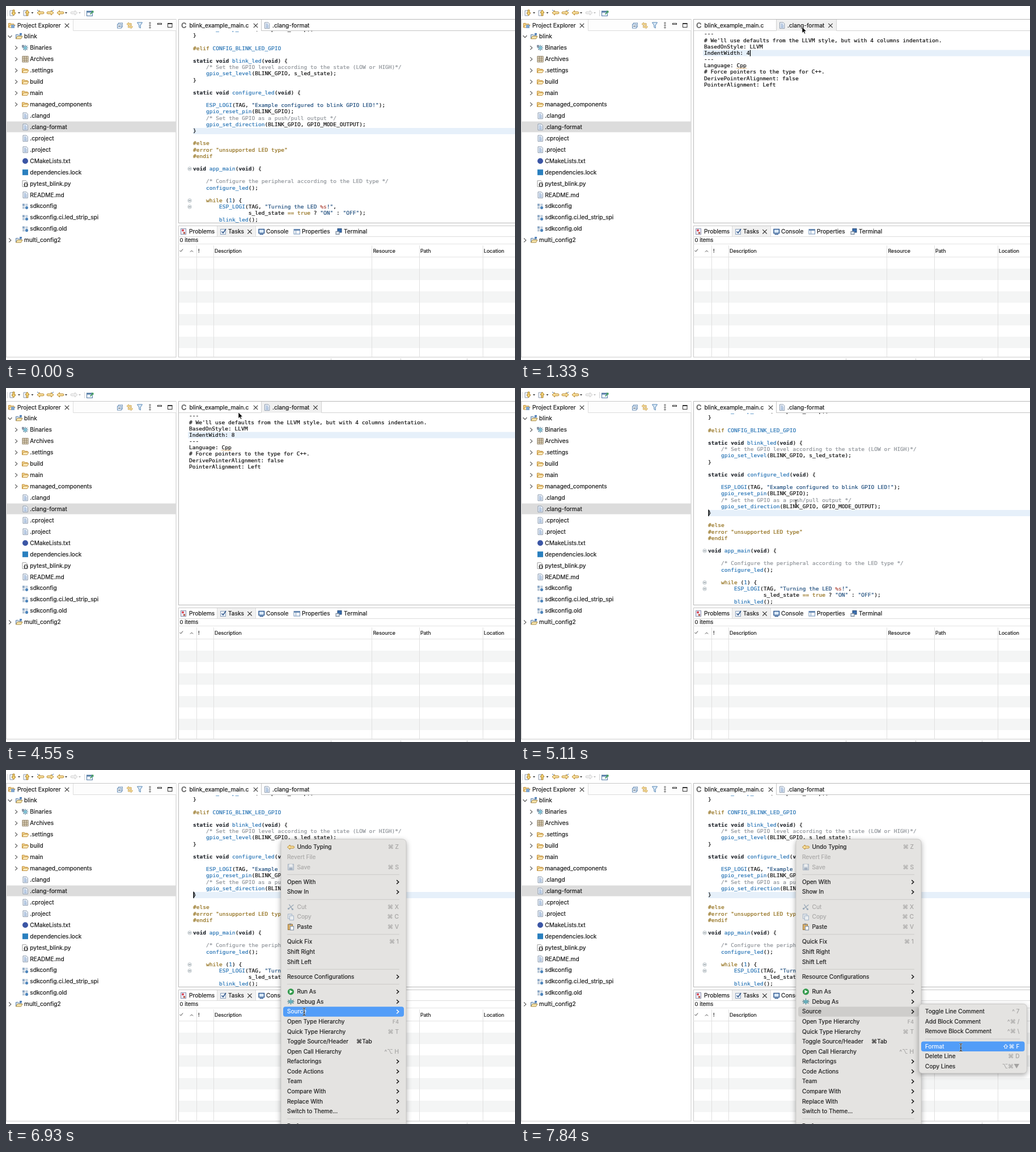
Write an HTML page that moves like this. It is 898x624 px and loops after 8 s.

```html
<!DOCTYPE html>
<html lang="en">
<head>
<meta charset="utf-8">
<title>Editor demo</title>
<style>
html, body { margin: 0; width: 100%; height: 100%; overflow: hidden; background: #fff; }
svg { display: block; }
text, tspan { fill: var(--ink); stroke: var(--ink); stroke-width: .18px; }
text { --ink: #161616; font: 10.2px Inter, "Open Sans", sans-serif; white-space: pre; }
text.head { font-size: 8.85px; }
text.count { font-size: 9.5px; }
text.menu { font-size: 10.15px; }
text.braces { font-size: 8.85px; font-weight: bold; }
text.letter { font-size: 13px; font-weight: bold; }
text.code { --ink: #0c0c0c; font: 9.56px "DejaVu Sans Mono", monospace; }
.kw { font-weight: bold; --ink: #22272e; }
.fn { --ink: #2472b4; }
.pp { --ink: #8f6b14; }
.str { --ink: #1b4b7c; }
.fmt { --ink: #b0483c; }
.cmt { --ink: #8d9298; }
path { fill: none; }
</style>
</head>
<body>
<svg id="stage" width="898" height="624" viewBox="0 0 898 624">
  <defs>
    <clipPath id="editor"><rect x="305" y="44" width="593" height="338"/></clipPath>
  </defs>
  <g id="base"></g>
  <g id="live"></g>
</svg>
<script>
const rect = (x, y, w, h, fill, more = '') =>
  `<rect x="${x}" y="${y}" width="${w}" height="${h}" fill="${fill}" ${more}/>`;
const line = (d, color, width = 1) => `<path d="${d}" stroke="${color}" stroke-width="${width}"/>`;
const shape = (d, fill, stroke = 'none', width = 1) =>
  `<path d="${d}" style="fill:${fill}" stroke="${stroke}" stroke-width="${width}"/>`;
const disc = (x, y, r, fill) => `<circle cx="${x}" cy="${y}" r="${r}" fill="${fill}"/>`;
const at = (x, y, inner) => `<g transform="translate(${x} ${y})">${inner}</g>`;
// y is the middle of the text line
const label = (x, y, s, cls = '', ink = '', more = '') =>
  `<text x="${x}" y="${y + 3.4}" class="${cls}" ${ink && `style="--ink:${ink}"`} ${more}>${s}</text>`;

const chevron = (x, y, color = '#444', w = 1.1) => at(x, y, line('M-1.8-3.4L1.8 0L-1.8 3.4', color, w));
const cross = (x, y) => at(x, y, line('M-3.7-3.7L3.7 3.7M3.7-3.7L-3.7 3.7', '#333', 1.1));
const drop = (x, color = '#333') => at(x, 12, shape('M-2-1H2L0 1.5Z', color));
const arrowLeft = (fill, edge) => shape('M-6 0L-1.5-4V-1.8H4Q6-1.8 6 0Q6 1.8 4 1.8H-1.5V4Z', fill, edge);
const flip = s => `<g transform="scale(-1 1)">${s}</g>`;
const gold = arrowLeft('#fbe3a0', '#b5842a');

const icons = {
  folder: shape('M-5.5 4V-3.5H-1.5L-.5-2.2H4V-.5', '#f3d58d', '#c18f3c') +
          shape('M-5.5 4L-3-.5H6L3.5 4Z', '#fcebbb', '#c18f3c'),
  project: shape('M-5.5 4V-3.5H-1.5L-.5-2.2H4V-.5', '#d5e2ee', '#5d7fa5') +
           shape('M-5.5 4L-3-.5H6L3.5 4Z', '#f7e5ac', '#a98a44') + rect(1, -6, 4, 3, '#4f7fb8'),
  file: shape('M-4-5.3H2L4.3-3V5.3H-4Z', '#f5f8fc', '#8797ac') +
        line('M-2.3-2.5H1.5M-2.3-.5H2.7M-2.3 1.5H2.7M-2.3 3.3H2.7', '#6f94c4', .9),
  binaries: line('M0-5V5M-5 0H5M-3.5-3.5L3.5 3.5M3.5-3.5L-3.5 3.5', '#41728f', 1.2) + disc(0, 0, 2.5, '#7cc3d6') +
            rect(-6, -5, 4, 4, '#8290a2'),
  archive: rect(-5, -5, 10, 10, '#fbf4df', 'stroke="#7d6a4d"') +
           line('M-5-1.7H5M-5 1.7H5M-1.7-5V5M1.7-5V5', '#7d6a4d'),
  disc: disc(0, 0, 5, '#3b56a5'),
  square: rect(-5, -5, 10, 10, '#2a80bf'),
  script: shape('M-5-5.3H1L3.3-3V5.3H-5Z', '#fff', '#9a9a9a') + label(-3, 1.5, '{}', 'braces'),
  config: rect(-5, -4.5, 4, 4, '#8ba6c4') + rect(0, -4.5, 4.5, 4, '#c2cfdd') +
          rect(-5, .5, 4, 4, '#b9c7d6') + disc(2.5, 2.5, 2.6, '#4f86bc')
};

const tree = [
  ['blink', 0, 'project', 1], ['Binaries', 1, 'binaries', 1], ['Archives', 1, 'archive', 1],
  ['.settings', 1, 'folder', 1], ['build', 1, 'folder', 1], ['main', 1, 'folder', 1],
  ['managed_components', 1, 'folder', 1], ['.clangd', 1, 'file'], ['.clang-format', 1, 'file'],
  ['.cproject', 1, 'file'], ['.project', 1, 'file'], ['CMakeLists.txt', 1, 'disc'],
  ['dependencies.lock', 1, 'square'], ['pytest_blink.py', 1, 'script'], ['README.md', 1, 'file'],
  ['sdkconfig', 1, 'config'], ['sdkconfig.ci.led_strip_spi', 1, 'config'], ['sdkconfig.old', 1, 'config'],
  ['multi_config2', 0, 'project', 1]
];

const EDGE = '#c9c9c9';

function toolbar() {
  const step = up => shape('M-5-4H1V5H-5Z', '#f4f7fb', '#8b98ab') +
    `<g transform="scale(1 ${up})">${shape('M0-5H3V0H5L1.5 5L-2 0H0Z', '#f6d778', '#a97c25')}</g>`;
  return line('M2.5 7V18M138.5 7V18', '#d6d6d6') +
    at(12, 12, step(1)) + drop(23) + at(36, 12, step(-1)) + drop(46.5) +
    at(61, 12, gold + line('M-6-5L-3-3', '#4a6f9d')) + at(78, 12, flip(gold) + line('M6-5L3-3', '#4a6f9d')) +
    at(96, 12, gold) + drop(106) + at(120, 12, flip(arrowLeft('#f3f3f3', '#cfcfcf'))) + drop(130, '#bbb') +
    at(148, 13, rect(-5.5, -4, 10, 8.5, '#eef4fa', 'stroke="#557ca6"') + rect(-5.5, -4, 10, 2.5, '#557ca6') +
      shape('M0 1L4-3L2.5-4.5H6.5V-.5L5-2L1.5 2Z', '#3f9d58'));
}

function explorer() {
  const head = rect(0.5, 23.5, 299.5, 595.5, '#fff', `stroke="${EDGE}"`) +
    rect(118, 24, 182, 19.5, '#fdfdfd') + line('M118.5 24V43.5H300', '#dcdcdc') +
    at(10, 34, icons.folder + rect(-1, -1, 6, 6, '#7fa5cf')) + label(20, 34.5, 'Project Explorer') + cross(107.5, 34.5) +
    at(201.5, 34, rect(-3, -4, 7, 7, '#fff', 'stroke="#6b90b8"') +
      rect(-5, -2, 7, 7, '#e8f0f8', 'stroke="#6b90b8"') + line('M-3.5 1.5H.5', '#345')) +
    at(218, 34, `<g transform="scale(.7)">${at(-1, -3, gold)}${at(2, 4, flip(gold))}</g>`) +
    at(236, 34, shape('M-4.5-5H4.5L1.2 0V5L-1.2 3.5V0Z', '#dcebf8', '#5585b5')) +
    [30, 34, 38].map(y => `<circle cx="254" cy="${y}" r="1.2" fill="#fff" stroke="#444" stroke-width=".8"/>`).join('') +
    rect(267.5, 30.5, 7, 2, '#fff', 'stroke="#333"') + rect(285.5, 30.5, 7.5, 7, '#fff', 'stroke="#333"') +
    line('M285 31.5H293.5', '#333');
  return head + rect(0, 203.5, 300, 19, '#dcdcdc') + tree.map(([name, level, icon, open], i) => {
    const y = 53.8 + i * 19.95;
    const twist = !open ? '' : i ? chevron(level ? 18 : 7, y, '#555')
      : at(7, y, line('M-3.4-1.8L0 1.8L3.4-1.8', '#555', 1.1));
    return twist + at(level ? 34 : 23, y, icons[icon]) + label(level ? 42.3 : 32, y, name);
  }).join('');
}

function tasks() {
  let s = rect(304.5, 387.5, 600, 231.5, '#fff', `stroke="${EDGE}"`) +
    rect(373, 388, 67.5, 18.5, '#f1f1f1') + line('M304 406.5H898M372.5 388V406M440.5 388V406', '#dcdcdc') +
    at(313, 397.5, rect(-4.5, -5, 9, 10, '#eef', 'stroke="#8890a8"') + disc(-1, -2, 2, '#d8434e') + disc(1.5, 2.5, 1.8, '#b5513a')) +
    at(383, 397.5, rect(-4.5, -4, 9, 9, '#edf3fa', 'stroke="#8ba0bb"') + line('M-2.5 0L0 2.5L5-4.5', '#33598c', 1.6)) +
    at(450.5, 397.5, rect(-4.5, -4, 9.5, 7, '#dbe9f8', 'stroke="#2f5a92" stroke-width="1.5"') + line('M-3 5H3.5', '#2f5a92', 1.5)) +
    at(513, 397.5, rect(-5, -4, 10.5, 8.5, '#fff', 'stroke="#6a8cb4"') + rect(-5, -4, 10.5, 2.5, '#6a8cb4') + line('M-1.5-2V4', '#6a8cb4')) +
    at(587, 397.5, rect(-2, -5, 7, 6.5, '#3a6fb0', 'stroke="#274a78"') + rect(-5, 0, 6, 5, '#dfe7ef', 'stroke="#6c7b8d"')) +
    label(323, 397.7, 'Problems') + label(392, 397.7, 'Tasks') + cross(430, 397.8) +
    label(459, 397.7, 'Console') + label(522, 397.7, 'Properties') + label(596, 397.7, 'Terminal') +
    label(306.5, 413, '0 items', 'count');
  for (let y = 463; y < 600; y += 40) s += rect(305, y, 593, 20, '#f4f5f5');
  s += line('M304 419.5H898M304 442.5H898', '#e4e4e4') +
    line([336, 366, 645, 729, 841].map(x => `M${x}.5 422V619`).join(''), '#e0e0e0') +
    line('M306.5 431L308.5 433L312 428.5M325 433.5L327.5 431L330 433.5', '#444') + label(339, 431.6, '!', 'head');
  [['Description', 368], ['Resource', 647.5], ['Path', 731], ['Location', 843]]
    .forEach(([name, x]) => s += label(x, 431.6, name, 'head'));
  return s + line('M573.5 621V624M696.5 621V624M813.5 621V624', '#d0d0d0');
}

const program = `    led_strip_clear(strip.led_strip);
}

#elif CONFIG_BLINK_LED_GPIO

static void blink_led(void) {
    /* Set the GPIO level according to the state (LOW or HIGH)*/
    gpio_set_level(BLINK_GPIO, s_led_state);
}

static void configure_led(void) {

    ESP_LOGI(TAG, "Example configured to blink GPIO LED!");
    gpio_reset_pin(BLINK_GPIO);
    /* Set the GPIO as a push/pull output */
    gpio_set_direction(BLINK_GPIO, GPIO_MODE_OUTPUT);
}

#else
#error "unsupported LED type"
#endif

void app_main(void) {

    /* Configure the peripheral according to the LED type */
    configure_led();

    while (1) {
        ESP_LOGI(TAG, "Turning the LED %s!",
                 s_led_state == true ? "ON" : "OFF");
        blink_led();`.split('\n');

const style = `---
# We'll use defaults from the LLVM style, but with 4 columns indentation.
BasedOnStyle: LLVM
IndentWidth: @
---
Language: Cpp
# Force pointers to the type for C++.
DerivePointerAlignment: false
PointerAlignment: Left`.split('\n');

const tokens = /(?<cmt>\/\*.*\*\/)|(?<str>"[^"]*")|(?<kw>\b(?:static|void)\b)|(?<pp>^#error.*|^#\w+|\b(?:while|true)\b|==)|(?<fn>\w+(?=\()|CONFIG\w+|\b\d\b)/g;
const span = (cls, s) => `<tspan class="${cls}">${s}</tspan>`;
const paint = s => s.replace(tokens, (m, ...rest) => {
  const groups = rest[rest.length - 1];
  const cls = Object.keys(groups).find(k => groups[k]);
  return span(cls, m.replace('%s', span('fmt', '%s')));
});
const codeLines = (lines, x, y) => lines.map((s, i) => s && label(x, y + i * 11.18 - .3, s, 'code')).join('');
const fold = y => `<circle cx="324" cy="${y}" r="3.2" fill="#f5f7f8" stroke="#a9b4ba" stroke-width=".8"/>` +
  line(`M322 ${y}H326`, '#66757d');

const programView = rect(330, 215, 568, 11, '#e6f0fa') + codeLines(program.map(paint), 330, 41) +
  [287, 343, 354].map(fold).join('');

function editor(t, mouse) {
  const onStyle = t >= 1260 && t < 4620;
  const dirty = t >= 2450 && t < 3780;
  const right = dirty ? 559.5 : 556.5;
  const overFirst = mouse.y < 48 && mouse.x < 450 && mouse.x > 305;
  let s = rect(304.5, 23.5, 600, 359, '#fff', 'stroke="#b8b8b8"');
  s += onStyle
    ? rect(450.5, 24, right - 450.5, 20, '#f0f0f0') + line(`M305 43.5H450.5V24M${right} 24V43.5H898`, '#d2d2d2')
    : line('M450.5 24V43.5H898', '#c4c4c4');
  s += label(309, 35.5, 'C', 'letter', '#707070') + label(323.5, 34.5, 'blink_example_main.c') +
    at(460.5, 34.3, icons.file) + label(470, 34.5, (dirty ? '*' : '') + '.clang-format');
  if (!onStyle || overFirst) s += cross(440.5, 34.5);
  if (onStyle) s += cross(dirty ? 549 : 546, 34.5);

  let body;
  if (onStyle) {
    const digit = t < 2450 ? '4' : t < 2870 ? '' : '8';
    const caret = t < 1890 || t >= 2450 && t < 3080 || t >= 3640 && t < 4130;
    body = rect(321, 77.5, 577, 11, '#e6f0fa') + codeLines(style.map(l => l.replace('@', digit)), 323, 49.3);
    if (dirty) body += rect(314, 77.5, 6.5, 11, '#eedfec');
    body += line('M380 110.5' + 'l1.5-1.5l1.5 1.5'.repeat(6), '#c98a3a', .8);
    if (caret) body += rect(digit ? 403.8 : 398, 77.5, 1.3, 11, '#000');
  } else {
    body = programView;
    if (t >= 4970 && t < 7000) body += rect(330.3, 214.5, 1.5, 11.5, '#000');
  }
  return s + `<g clip-path="url(#editor)">${body}</g>`;
}

// [name, shortcut, icon]: ">" opens a submenu, a leading "-" is greyed out, null is a separator
const mainMenu = [
  ['Undo Typing', '⌘ Z', 'undo'], ['-Revert File', ''], ['-Save', '⌘ S', 'save'], null,
  ['Open With', '>'], ['Show In', '>'], null,
  ['-Cut', '⌘ X', 'cut'], ['-Copy', '⌘ C', 'copy'], ['Paste', '⌘ V', 'paste'], null,
  ['Quick Fix', '⌘ 1'], ['Shift Right', ''], ['Shift Left', ''], null,
  ['Resource Configurations', '>'], null,
  ['Run As', '>', 'run'], ['Debug As', '>', 'bug'], ['Source', '>'], ['Open Type Hierarchy', 'F4'],
  ['Quick Type Hierarchy', '⌘ T'], ['Toggle Source/Header', ''], ['Open Call Hierarchy', '^⌥ H'],
  ['Refactorings', '>'], ['Code Actions', '>'], ['Team', '>'], ['Compare With', '>'],
  ['Replace With', '>'], ['Switch to Theme...', '>'], null, ['Preferences...', '']
];
const subMenu = [
  ['Toggle Line Comment', '^ 7'], ['Add Block Comment', '^⌘ /'], ['Remove Block Comment', '^⌘ \\'], null,
  ['Format', '⇧⌘ F'], ['Delete Line', '⌘ D'], ['Copy Lines', '⌥⌘▼']
];
const menuIcons = {
  undo: gold,
  save: rect(-5, -5, 10, 10, '#cdd6e0', 'stroke="#8fa0b5"') + rect(-2.5, -5, 5, 4, '#f0f2f4') + rect(-3, 1, 6, 4, '#8fa0b5'),
  cut: line('M-4 3L5-4M-3-4.5L3 4.5', '#8397ab', 1.3) + disc(-4, 3, 1.6, '#8397ab') + disc(3, 4, 1.6, '#8397ab'),
  copy: rect(-5, -5, 7, 8, '#e3e8ee', 'stroke="#8fa6c0"') + rect(-2, -2, 7, 7.5, '#eef2f6', 'stroke="#8fa6c0"'),
  paste: rect(-5, -4.5, 8, 9.5, '#dcb26b', 'stroke="#97733c"') + rect(-3, -6, 4, 2.5, '#8c8c8c') + rect(-1, -1, 6, 6.5, '#f6f8fa', 'stroke="#7c8da3"'),
  run: disc(0, 0, 5.6, '#339a4d') + shape('M-2-3.2L3.3 0L-2 3.2Z', '#fff'),
  bug: line('M-5-3L5 3M5-3L-5 3M-6 0H6M0-6V5', '#3f7783', 1.1) + disc(0, 0, 3.2, '#67aebb')
};
const ROW = 17.57;

function menu(items, box, textX, top, mouse, openItem) {
  const [x, y, w, h] = box;
  const inside = mouse.x >= x + 4 && mouse.x < x + w - 4;
  let s = rect(x, y, w, h, '#e4e3e1', 'rx="6" stroke="#c3c2c0" stroke-width=".8" style="filter:drop-shadow(0 3px 5px #0005)"');
  let rowY = top;
  for (const item of items) {
    if (!item) {
      s += line(`M${textX} ${rowY - 4.4}H${x + w - 12}`, '#cbcac8');
      rowY += 8.8;
      continue;
    }
    const [raw, keys, icon] = item;
    const off = raw[0] == '-', name = raw.replace('-', '');
    const hot = !off && inside && Math.abs(mouse.y - rowY) < ROW / 2;
    if (hot || name == openItem)
      s += rect(x + 4, rowY - 8.8, w - 8, ROW, hot ? '#529df8' : '#cecdcb', 'rx="4"');
    const ink = hot ? '#fff' : off ? '#a9a8a7' : '#1c1c1c';
    if (icon) s += at(textX + 6.5, rowY, off ? `<g opacity=".75">${menuIcons[icon]}</g>` : menuIcons[icon]);
    s += label(textX + (icon ? 17.5 : 0), rowY, name, 'menu', ink);
    if (keys == '>') s += chevron(x + w - 15, rowY, ink, 1.5);
    else if (keys) s += label(x + w - 13, rowY, keys, keys == 'F4' ? 'head' : 'menu', hot ? '#fff' : '#a3a2a1', 'text-anchor="end"');
    if (name.startsWith('Toggle Source')) s += label(618, rowY, '⌘Tab', 'menu');
    rowY += ROW;
  }
  return s;
}

const track = [
  [0, 517, 314], [210, 517, 314], [420, 457, 136], [630, 457, 136], [1120, 496, 37], [1750, 496, 37],
  [1960, 449.5, 74], [3780, 449.5, 75], [4550, 410, 43], [4830, 410, 43], [5110, 485, 204], [6160, 485, 204],
  [6370, 526, 380], [6580, 526, 380], [6790, 526, 426], [7140, 526, 426], [7350, 735, 426], [7420, 735, 426],
  [7840, 776, 489], [8000, 776, 489]
];
function mouseAt(t) {
  const i = track.findIndex(k => k[0] > t);
  const [t0, x0, y0] = track[i - 1], [t1, x1, y1] = track[i];
  const f = (t - t0) / (t1 - t0);
  return { x: x0 + (x1 - x0) * f, y: y0 + (y1 - y0) * f };
}
function pointer(t, { x, y }) {
  if (t < 140 || t >= 2450 && t < 3570) return '';
  if (y < 44) return at(x, y, shape('M0 0V10.5L2.5 8.3L4.1 12L5.8 11.2L4.2 7.7L7.4 7.5Z', '#000', '#fff', .6));
  const beam = 'M-2.5-6.5Q0-6.5 0-5V5Q0 6.5-2.5 6.5M2.5-6.5Q0-6.5 0-5M0 5Q0 6.5 2.5 6.5M-1.3 1H1.3';
  return at(x, y, line(beam, '#fff', 2.2) + line(beam, '#111', 1.1));
}

function scene(t) {
  const mouse = mouseAt(t);
  let s = editor(t, mouse);
  if (t >= 5740) s += menu(mainMenu, [485, 122, 221, 520], 496, 136, mouse, t >= 7000 ? 'Source' : '');
  if (t >= 7000) s += menu(subMenu, [702, 412.5, 190.5, 122], 713, 425.8, mouse);
  return s + pointer(t, mouse);
}

const base = document.getElementById('base'), live = document.getElementById('live');
base.innerHTML = rect(0, 0, 898, 624, '#fff') + toolbar() + explorer() + tasks();
const start = performance.now();
let shown = -1;
function frame() {
  const t = Math.floor((performance.now() - start) % 8000 / 70) * 70;
  if (t != shown) live.innerHTML = scene(shown = t);
  requestAnimationFrame(frame);
}
frame();
</script>
</body>
</html>
```
